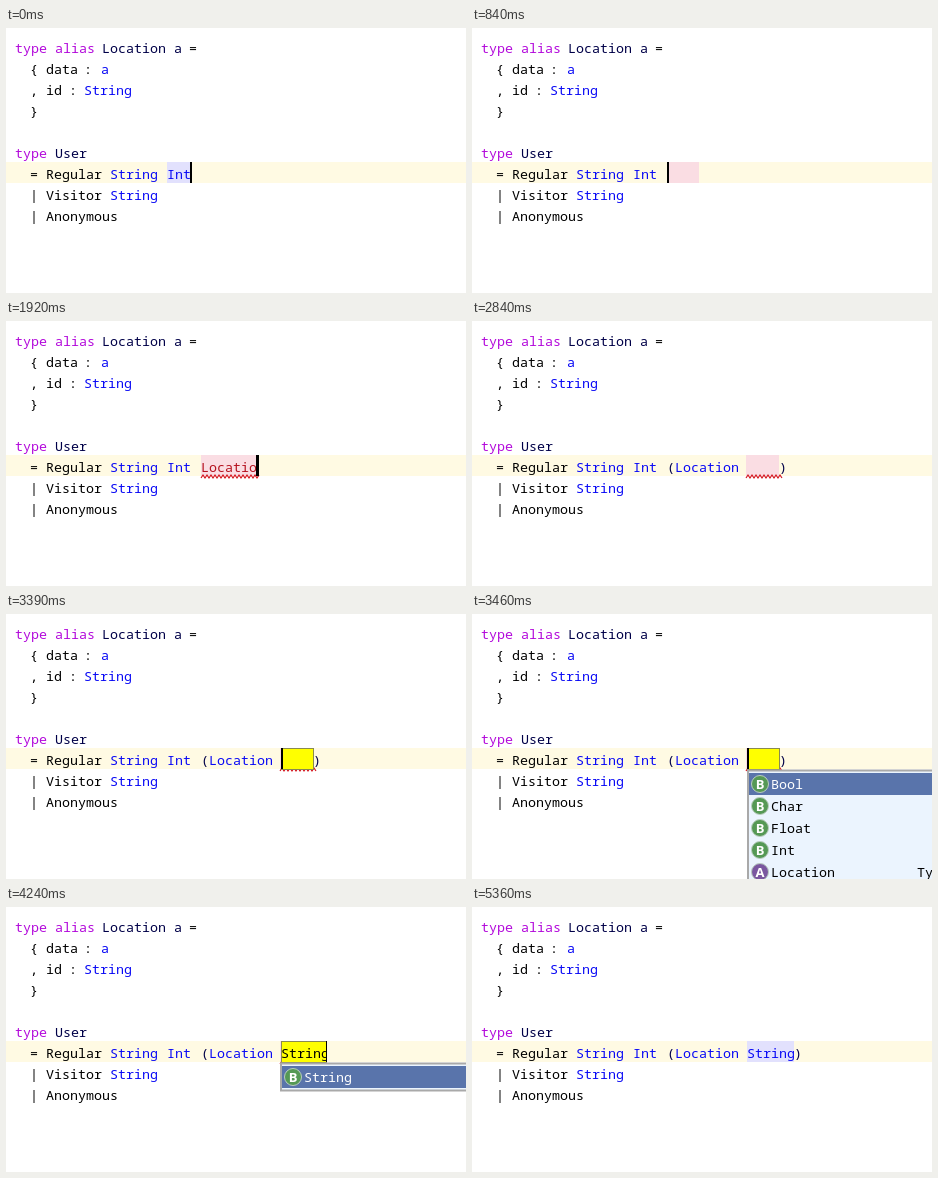
These frames come from a looping animation (460x265 px, 5760 ms). An HTML page:

```html
<!DOCTYPE html>
<html lang="en">
<head>
<meta charset="utf-8">
<title>Editing a union type</title>
<style>
  html, body { margin: 0; width: 100%; height: 100%; overflow: hidden; background: #fff; }
  svg { display: block; width: 460px; height: 265px; }
  text { font: 13.33px "Noto Sans Mono", monospace; white-space: pre; fill: #000; }
  .name { fill: #000048; }
  .key { fill: #b30adb; }
  .type { fill: #0a0af5; }
  .error { fill: #b5121f; }
  .light { fill: #fff; }
  .icon { font: bold 13px "Open Sans", sans-serif; fill: #fff; text-anchor: middle; }
  .wave { fill: none; stroke: #d4141c; stroke-width: 1.2; }
</style>
</head>
<body>
<svg viewBox="0 0 460 265">
  <rect y="134" width="460" height="21" fill="#fffae3"/>
  <g id="code"></g>
  <g id="live"></g>
</svg>
<script>
const LOOP = 5760, CHAR = 8, TOP = 134, ROW = 21;
const PINK = '#fadde3', LILAC = '#e2e1fd', BLUE = '#5974ab';

const rect = (x, y, w, h, fill, extra = '') =>
  `<rect x="${x}" y="${y}" width="${w}" height="${h}" fill="${fill}" ${extra}/>`;
const text = (x, y, str, cls = '') => `<text x="${x}" y="${y}" class="${cls}">${str}</text>`;
const line = (row, ...words) =>
  words.map(([x, str, cls]) => text(x, 25 + row * ROW, str, cls)).join('');
const edit = (x, str, cls) => line(6, [x, str, cls]);
const mark = (x, w, fill) => rect(x, TOP, w, ROW, fill);
const caret = (x, w = 2) => mark(x, w, '#000');

function wave(from, to) {
  let d = `M${from} 157`;
  for (let x = from + 2, up = true; x <= to; x += 2, up = !up) d += `L${x} ${up ? 154 : 157}`;
  return `<path class="wave" d="${d}"/>`;
}

// Highlighted reference with an optional caret behind it
const chosen = (x, str, blink) =>
  mark(x, str.length * CHAR - 1, LILAC) + edit(x, str, 'type') + (blink ? caret(x + str.length * CHAR - 1) : '');

// Third argument of the constructor while its name is being typed
function typing(str) {
  const end = 195 + str.length * CHAR;
  return mark(195, end - 195, PINK) + edit(195, str, 'error') + wave(195, end + 3) + caret(end - 1, 3);
}

const emptyArg = bad => mark(195, 32, PINK) + (bad ? wave(195, 231) : '') + caret(195);

const call = edit(195, '(', 'name') + edit(203, 'Location', 'type');
const hole = (bad, blink) =>
  call + mark(274, 33, PINK) + edit(307, ')', 'name') + (bad ? wave(274, 311) : '') + (blink ? caret(275) : '');

function field(str) {
  const w = Math.max(33, str.length * CHAR - 2);
  const box = rect(275.5, TOP + .5, w - 1, ROW, '#ff0', 'stroke="#8a8a50"');
  const cursor = str ? rect(Math.min(275 + str.length * CHAR, 320), TOP, 1, ROW, '#000') : caret(275);
  return hole(true) + box +
    `<svg x="275" y="0" width="${w}" height="265" viewBox="275 0 ${w} 265">${edit(275, str)}</svg>` + cursor;
}

function popup(x, items) {
  const h = items.length * 22 + 6;
  let out = rect(x + 1, 156.5, 190, h - 1, '#ebf4fe', 'stroke="#a9a9a9" stroke-width="2"') +
    rect(x + 2, 159, 190, 22, BLUE);
  items.forEach(([icon, name, note], i) => {
    const y = 170 + i * 22, color = icon === 'B' ? '#559955' : '#7a57a0';
    out += `<circle cx="${x + 13}" cy="${y}" r="8.5" fill="${color}" stroke="#b9cdbf"/>` +
      `<text class="icon" x="${x + 13}" y="${y + 5}">${icon}</text>` +
      text(x + 24, y + 5, name, i ? '' : 'light') + (note ? text(445, y + 5, note) : '');
  });
  return out;
}

const string = ['B', 'String'];
const types = [...['Bool', 'Char', 'Float', 'Int'].map(n => ['B', n]), ['A', 'Location', 'Type alias']];
const int = edit(161, 'Int', 'type');
const search = str => int + field(str) + popup(274, [string]);
const done = blink => int + call + chosen(275, 'String', blink) + edit(322, ')', 'name');

const states = [
  [0, chosen(161, 'Int', true)],
  [380, chosen(161, 'Int', false)],
  [840, int + emptyArg(false)],
  [1160, int + emptyArg(true)],
  [1230, int + typing('L')],
  [1450, int + typing('Lo')],
  [1520, int + typing('Loc')],
  [1690, int + typing('Loca')],
  [1840, int + typing('Locati')],
  [1920, int + typing('Locatio')],
  [2150, int + hole(false, true)],
  [2380, int + hole(true, true)],
  [2840, int + hole(true, false)],
  [3390, int + field('')],
  [3460, int + field('') + popup(275, types)],
  [3780, int + field('S') + popup(274, [string, ['T', 'User', 'Type']])],
  [4010, search('St')],
  [4090, search('Str')],
  [4160, search('Strin')],
  [4240, search('String')],
  [4510, done(true)],
  [5360, done(false)]
];

document.getElementById('code').innerHTML =
  line(0, [9, 'type', 'key'], [49, 'alias', 'key'], [96, 'Location', 'name'], [168, 'a', 'name'], [183, '=']) +
  line(1, [24, '{'], [40, 'data'], [78, ':'], [95, 'a', 'type']) +
  line(2, [24, ','], [40, 'id'], [63, ':'], [78, 'String', 'type']) +
  line(3, [24, '}']) +
  line(5, [9, 'type', 'key'], [49, 'User', 'name']) +
  line(6, [24, '='], [40, 'Regular'], [104, 'String', 'type']) +
  line(7, [24, '|'], [40, 'Visitor'], [104, 'String', 'type']) +
  line(8, [24, '|'], [40, 'Anonymous']);

const live = document.getElementById('live');
const start = performance.now();
let shown = -1;

function draw() {
  const t = (performance.now() - start) % LOOP;
  const now = states.findLastIndex(([at]) => at <= t);
  if (now !== shown) live.innerHTML = states[shown = now][1];
  requestAnimationFrame(draw);
}
draw();
</script>
</body>
</html>
```
